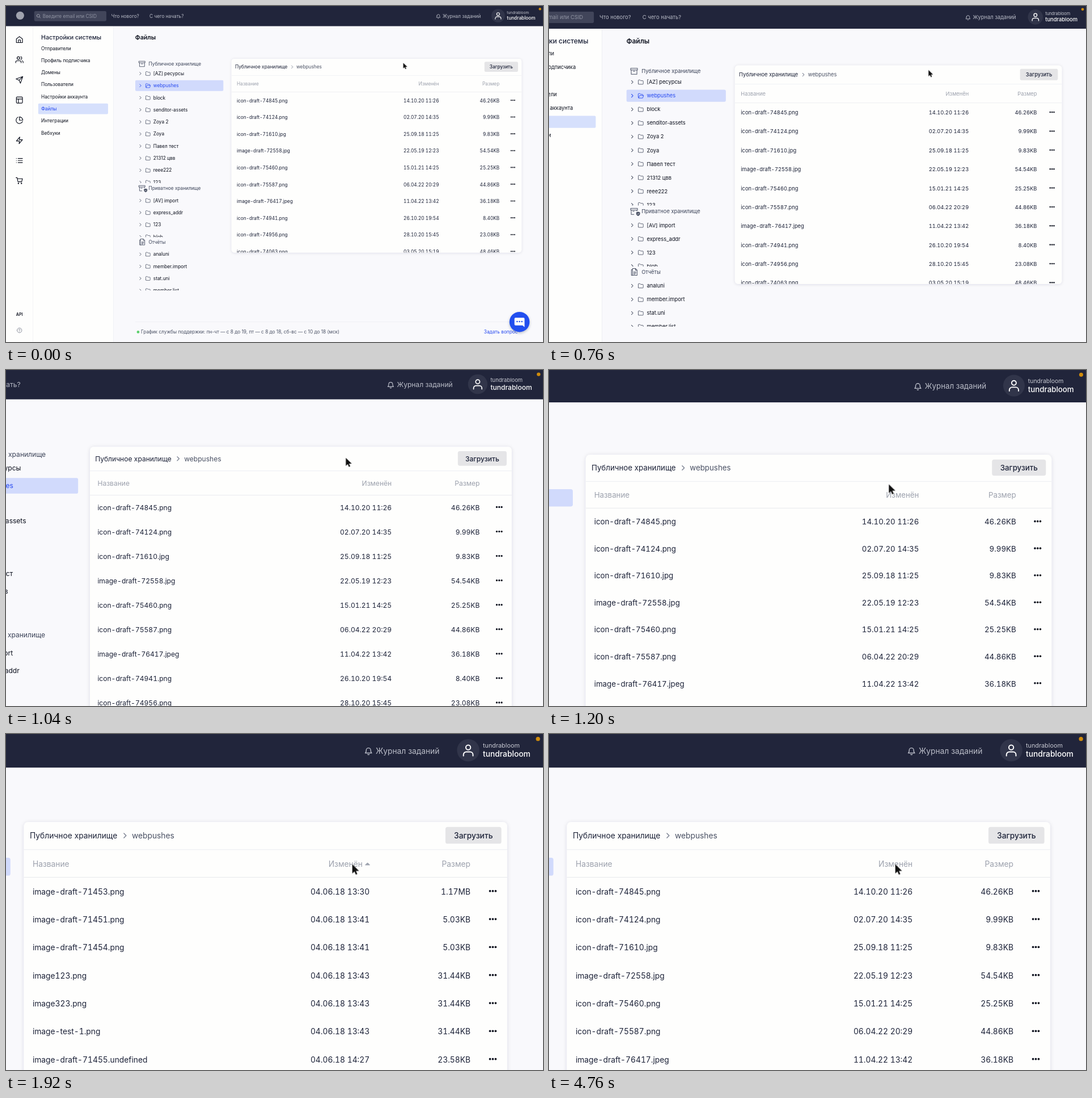
These frames come from a looping animation (947x592 px, 5.96 s). An HTML page:

```html
<!DOCTYPE html>
<html lang="ru">
<head>
<meta charset="utf-8">
<title>Файлы</title>
<style>
html, body { margin: 0; width: 100%; height: 100%; overflow: hidden; background: #f9f9fc; }
svg { display: block; width: 947px; height: 592px; font: 14px Inter, sans-serif; }
text { white-space: pre; }
.icon { fill: none; stroke-linecap: round; stroke-linejoin: round; }
.end { text-anchor: end; }
.mid { text-anchor: middle; }
.medium { font-weight: 500; }
.title { font-size: 18px; }
.semi { font-weight: 600; }
.small { font-size: 11px; }
.api { font-size: 12px; font-weight: 600; }
.table { font-variant-numeric: tabular-nums; }

#camera { transform-origin: 1600px 0; animation: zoom 5960ms infinite; }
#pointer { animation: move 5960ms infinite; }
#plain, #asc, #desc { animation: plain 5960ms step-end infinite; }
#asc { animation-name: asc; }
#desc { animation-name: desc; }

@keyframes zoom {
  0%, 8.054% { transform: scale(1); animation-timing-function: cubic-bezier(.333, 0, .667, .413); }
  10.067% { transform: scale(1.0272); animation-timing-function: cubic-bezier(.333, .172, .667, .513); }
  14.765% { transform: scale(1.2444); animation-timing-function: cubic-bezier(.333, .333, .667, .876); }
  20.134% { transform: scale(1.6056); animation-timing-function: cubic-bezier(.333, .967, .667, 1); }
  27.181%, 100% { transform: scale(1.6667); }
}
@keyframes move {
  0%, 15.1% { transform: translate(1183.6px, 169.2px); animation-timing-function: ease-in-out; }
  23.49%, 100% { transform: translate(1259px, 232.6px); }
}
@keyframes plain {
  0% { visibility: visible; }
  32.214% { visibility: hidden; }
  79.865%, 100% { visibility: visible; }
}
@keyframes asc {
  0% { visibility: hidden; }
  32.214% { visibility: visible; }
  55.704%, 100% { visibility: hidden; }
}
@keyframes desc {
  0% { visibility: hidden; }
  55.704% { visibility: visible; }
  79.865%, 100% { visibility: hidden; }
}
</style>
</head>
<body>
<svg viewBox="0 0 1600 1000.2" preserveAspectRatio="xMinYMin meet">
  <defs>
    <filter id="soft" x="-10%" y="-10%" width="120%" height="120%">
      <feDropShadow dx="0" dy="1" stdDeviation="4" flood-color="#1c2540" flood-opacity=".13"/>
    </filter>
    <filter id="lift" x="-30%" y="-30%" width="160%" height="160%">
      <feDropShadow dx="0" dy="3" stdDeviation="4" flood-color="#1c2540" flood-opacity=".3"/>
    </filter>
    <clipPath id="cardClip"><rect x="672" y="157" width="864" height="577" rx="8"/></clipPath>
  </defs>
  <g id="camera"></g>
</svg>
<script>
const INK = '#0c101d', NAVY = '#1c2238', SLATE = '#4a5164', MUTED = '#9ca1ad',
      BLUE = '#2548f0', PALE = '#b9bcc7', LINE = '#eaecf1', PAPER = '#fefefd';

const text = (x, y, str, fill = INK, cls = '') =>
  `<text x="${x}" y="${y}" fill="${fill}" class="${cls}">${str}</text>`;
const rect = (x, y, w, h, fill, r = 0, more = '') =>
  `<rect x="${x}" y="${y}" width="${w}" height="${h}" rx="${r}" fill="${fill}" ${more}/>`;
const dot = (x, y, r, fill, more = '') =>
  `<circle cx="${x}" cy="${y}" r="${r}" fill="${fill}" ${more}/>`;
// Icon paths are drawn in a square box centred on x, y.
const icon = (x, y, d, stroke = INK, box = 24, width = 2) =>
  `<path class="icon" transform="translate(${x - box / 2} ${y - box / 2})" d="${d}" stroke="${stroke}" stroke-width="${width}"/>`;
const ring = (x, y, r) => `M${x - r} ${y}a${r} ${r} 0 1 0 ${2 * r} 0a${r} ${r} 0 1 0 ${-2 * r} 0`;

const ICONS = {
  home: 'M3 10l9-7 9 7v11H3zM9 21v-8h6v8',
  users: 'M17 21v-2a4 4 0 0 0-4-4H5a4 4 0 0 0-4 4v2M23 21v-2a4 4 0 0 0-3-3.9M16 3.1a4 4 0 0 1 0 7.8' + ring(9, 7, 4),
  send: 'M22 2L11 13M22 2l-7 20-4-9-9-4z',
  layout: 'M5 3h14a2 2 0 0 1 2 2v14a2 2 0 0 1-2 2H5a2 2 0 0 1-2-2V5a2 2 0 0 1 2-2zM3 9h18M9 21V9',
  pie: 'M21.2 15.9A10 10 0 1 1 8 2.8M22 12A10 10 0 0 0 12 2v10z',
  bolt: 'M13 2L3 14h9l-1 8 10-12h-9z',
  list: 'M8 6h13M8 12h13M8 18h13M3 6h.01M3 12h.01M3 18h.01',
  cart: 'M2 3h3l2.7 12h11l2.3-9H6' + ring(9, 20, 1) + ring(18, 20, 1)
};
const CHEVRON = 'M6 4l4 4-4 4';
const FOLDER = 'M1.5 12.5v-9a1.2 1.2 0 0 1 1.2-1.2h3.5l1.7 2h5.4a1.2 1.2 0 0 1 1.2 1.2v7a1.2 1.2 0 0 1-1.2 1.2H2.7a1.2 1.2 0 0 1-1.2-1.2z';
const FOLDER_OPEN = 'M2.5 13.5l2.2-6h10.8l-2.2 6zM2.5 13.5a1.2 1.2 0 0 1-1.2-1.2V3.5a1.2 1.2 0 0 1 1.2-1.2h3.5l1.7 2h4.6a1.2 1.2 0 0 1 1.2 1.2v2';
const ARCHIVE = 'M1 2h18v4.5H1zM2.5 6.5V18h15V6.5M7.5 10h5';
const SAFE = 'M1 2h18v4.5H1zM2.5 6.5V18h7M17.5 6.5v2.5M6.5 10h4';
const REPORT = 'M6 1h8l4 4v14H6zM13.5 1v4.5H18M6 4H3v15h3M9 10h6M9 13h6M9 16h4';
const BELL = 'M4 7a4 4 0 0 1 8 0c0 4 1.8 5 1.8 5H2.2S4 11 4 7zM6.7 14.3a1.5 1.5 0 0 0 2.6 0';

function header() {
  return rect(0, 0, 1600, 60, '#21253b') +
    dot(42, 28.5, 12, '#a0a3ae') +
    rect(84, 15, 215, 30, '#41455a', 4) +
    icon(97, 30, 'M10.5 10.5l3 3' + ring(7, 7, 4.3), '#a3a6b3', 16, 1.5) +
    text(109.5, 35, 'Введите email или CSID', '#9094a3') +
    text(314, 35, 'Что нового?', PALE) +
    text(427.5, 35, 'С чего начать?', PALE) +
    icon(1288, 30, BELL, PALE, 16, 1.4) +
    text(1301, 35, 'Журнал заданий', PALE) +
    dot(1466.3, 29, 20, '#31354a') +
    icon(1466.3, 29, 'M3.5 22v-2a5 5 0 0 1 5-5h7a5 5 0 0 1 5 5v2' + ring(12, 7, 4.2), '#fff') +
    text(1492.5, 24, 'tundrabloom', '#c6c8d1', 'small') +
    text(1492.5, 41, 'tundrabloom', '#fff', 'medium') +
    dot(1591, 8.8, 3.7, '#d08c0c');
}

function sidebars() {
  const items = ['Отправители', 'Профиль подписчика', 'Домены', 'Пользователи',
    'Настройки аккаунта', 'Файлы', 'Интеграции', 'Вебхуки'];
  return rect(0, 60, 320, 945, PAPER) +
    rect(80, 60, 1, 945, LINE) + rect(320, 60, 1, 945, LINE) +
    Object.values(ICONS).map((d, i) => icon(40, 100 + 60 * i, d)).join('') +
    text(40, 922, 'API', INK, 'api mid') +
    icon(40, 965.5, 'M6 6.3a2 2 0 1 1 3 1.8q-1 .6-1 1.4M8 11.6v.01' + ring(8, 8, 7), '#6a7080', 16, 1.3) +
    text(104.8, 99, 'Настройки системы', NAVY, 'title medium') +
    rect(96, 290, 208, 32, '#d6e0fc', 3) +
    items.map((s, i) => text(104.8, 131 + 36 * i, s, i === 5 ? BLUE : INK)).join('');
}

function branch(id, title, y, art, names, first, bottom) {
  const rows = names.map((name, i) => {
    const cy = first + 36 * i, open = name === 'webpushes', tint = open ? BLUE : SLATE;
    return (open ? rect(385, cy - 16, 263, 32, '#d1dafc', 4) : '') +
      icon(400.5, cy, CHEVRON, tint, 16, 1.5) +
      icon(423, cy, open ? FOLDER_OPEN : FOLDER, tint, 16, 1.3) +
      text(439, cy + 5, name, open ? BLUE : INK);
  });
  return `<clipPath id="${id}">${rect(385, y, 263, bottom - y, '#000')}</clipPath>` +
    icon(405.3, y, art, SLATE, 20, 1.5) +
    text(425, y + 5, title, '#3b4358') +
    `<g clip-path="url(#${id})">${rows.join('')}</g>`;
}

function tree() {
  return branch('open', 'Публичное хранилище', 172.4, ARCHIVE,
      ['[AZ] ресурсы', 'webpushes', 'block', 'senditor-assets', 'Zoya 2', 'Zoya',
        'Павел тест', '21312 цвв', 'reee222', '123'], 201, 527) +
    branch('closed', 'Приватное хранилище', 542.4, SAFE,
      ['[AV] import', 'express_addr', '123', 'blob'], 579, 688) +
    `<path d="M411 545l5-1.5 5 1.5v4q0 3.5-5 5.500-5-2-5-5.500z" fill="${SLATE}"/>` +
    icon(416, 549, 'M3 5l1.500 1.500 2.500-3', '#fff', 10, 1.2) +
    branch('reports', 'Отчёты', 702.4, REPORT,
      ['analuni', 'member.import', 'stat.uni', 'member.list'], 739, 847);
}

const TABLES = {
  plain: `icon-draft-74845.png|14.10.20 11:26|46.26KB
icon-draft-74124.png|02.07.20 14:35|9.99KB
icon-draft-71610.jpg|25.09.18 11:25|9.83KB
image-draft-72558.jpg|22.05.19 12:23|54.54KB
icon-draft-75460.png|15.01.21 14:25|25.25KB
icon-draft-75587.png|06.04.22 20:29|44.86KB
image-draft-76417.jpeg|11.04.22 13:42|36.18KB
icon-draft-74941.png|26.10.20 19:54|8.40KB
icon-draft-74956.png|28.10.20 15:45|23.08KB
icon-draft-74063.png|03.05.20 15:19|48.46KB`,
  asc: `image-draft-71453.png|04.06.18 13:30|1.17MB
image-draft-71451.png|04.06.18 13:41|5.03KB
image-draft-71454.png|04.06.18 13:41|5.03KB
image123.png|04.06.18 13:43|31.44KB
image323.png|04.06.18 13:43|31.44KB
image-test-1.png|04.06.18 13:43|31.44KB
image-draft-71455.undefined|04.06.18 14:27|23.58KB`,
  desc: `image-draft-87572.png|15.07.24 11:28|61.27KB
icon-draft-87572.png|15.07.24 11:28|6.40KB
icon-87318.png|03.07.24 12:33|40.39KB
icon-draft-87316.jpg|03.07.24 12:30|91.21KB
image-draft-86933.PNG|26.06.24 12:37|14.72KB
image-draft-86933.jpg|26.06.24 11:18|166.26KB
icon-draft-86933.png|26.06.24 11:18|18.85KB`
};
const ARROWS = { asc: 'M1282.300 234l4-4 4 4z', desc: 'M1282.300 231l4 4 4-4z' };

function table(id) {
  const rows = TABLES[id].split('\n').map((line, i) => {
    const [name, date, size] = line.split('|'), y = 286.5 + 50 * i;
    return text(687.6, y, name, NAVY) +
      text(1290, y, date, NAVY, 'end') +
      text(1470.3, y, size, NAVY, 'end');
  });
  const arrow = ARROWS[id];
  return `<g id="${id}" class="table">` +
    text(arrow ? 1277.5 : 1290, 237, 'Изменён', MUTED, 'end') +
    (arrow ? `<path d="${arrow}" fill="${MUTED}" stroke="${MUTED}" stroke-linejoin="round"/>` : '') +
    rows.join('') + '</g>';
}

function card() {
  let dots = '';
  for (let i = 0; i < 10; i++)
    for (let j = -1; j < 2; j++) dots += dot(1510.3 + 5 * j, 280.5 + 50 * i, 1.9, INK);
  return rect(672, 157, 864, 577, PAPER, 8, 'filter="url(#soft)"') +
    rect(672, 206, 864, 1, LINE) + rect(672, 255.5, 864, 1, '#e6e8ed') +
    text(682.6, 186.5, 'Публичное хранилище', NAVY) +
    icon(852.8, 181.5, CHEVRON, '#7b8191', 16, 1.5) +
    text(865, 186.5, 'webpushes', SLATE) +
    rect(1425.6, 166, 100, 30, '#e5e5e7', 4) +
    text(1475.6, 186.5, 'Загрузить', NAVY, 'medium mid') +
    text(687.6, 237, 'Название', MUTED) +
    text(1470.3, 237, 'Размер', MUTED, 'end') +
    `<g clip-path="url(#cardClip)">${Object.keys(TABLES).map(table).join('')}${dots}</g>`;
}

function footer() {
  return rect(385, 940, 1151, 1, LINE) +
    dot(393.6, 970.6, 4, '#5bd06c') +
    text(402, 975.5, 'График службы поддержки: пн-чт — с 8 до 19, пт — с 8 до 18, сб-вс — с 10 до 18 (мск)', SLATE) +
    text(1424, 975.5, 'Задать вопрос', BLUE) +
    dot(1530, 940.5, 30, '#2350ef', 'filter="url(#lift)"') +
    '<path d="M1518 928h24a3 3 0 0 1 3 3v25l-6-5h-21a3 3 0 0 1-3-3v-17a3 3 0 0 1 3-3z" fill="#fff"/>' +
    [-7, 0, 7].map(dx => dot(1530 + dx, 939.5, 2.2, '#2350ef')).join('');
}

const pointer = '<path id="pointer" d="M0 0V16.500L3.900 12.900 6.300 18.600 9 17.500 6.600 11.900H12z" ' +
  'fill="#111" stroke="#fff" stroke-width="1" paint-order="stroke"/>';

document.getElementById('camera').innerHTML =
  rect(0, 0, 1600, 1005, '#f9f9fc') + sidebars() + header() +
  text(385, 99, 'Файлы', INK, 'title semi') +
  tree() + card() + footer() + pointer;
</script>
</body>
</html>
```
